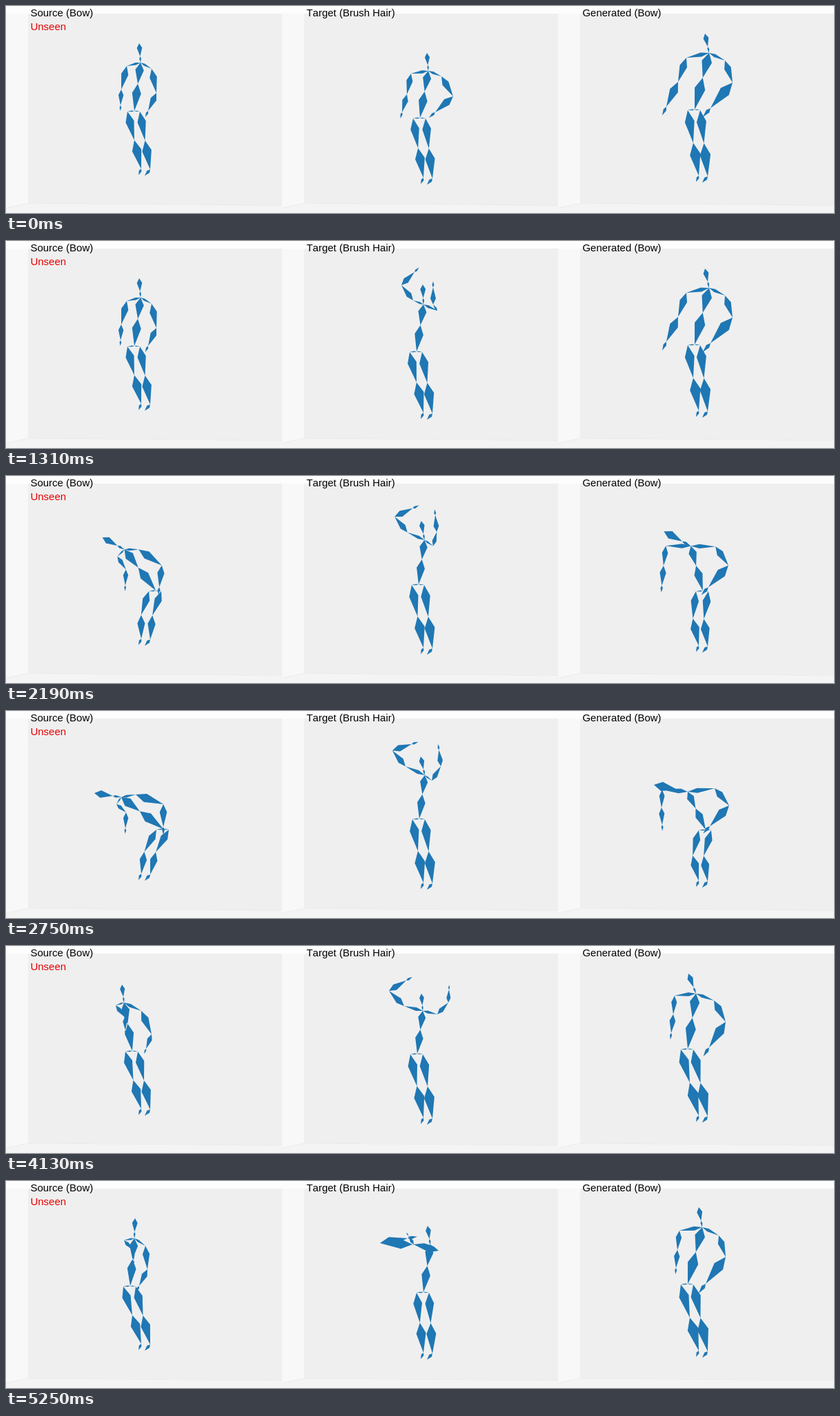
These frames come from a looping animation (1200 px wide and 300 px high, 5310 ms). An HTML page:

```html
<!DOCTYPE html>
<html lang="en">
<head>
<meta charset="utf-8">
<title>Three skeletons</title>
<style>
html, body { margin: 0; width: 100%; height: 100%; overflow: hidden; background: #fdfdfd; }
svg { display: block; width: 1200px; height: 300px; }
text { font: 15px "Liberation Sans", Arial, sans-serif; font-kerning: none; }
.bones { fill: #1f77b4; }
</style>
</head>
<body>
<svg viewBox="0 0 1200 300">
  <defs>
    <g id="room">
      <path fill="#f8f8f8" d="M0 11H32V286L0 293Z"/>
      <path fill="#f4f4f4" d="M0 293L32 286L400 289V300H0Z"/>
      <path fill="#efefef" d="M32 11H400V289L32 286Z"/>
      <path fill="none" stroke="#e9e9e9" stroke-width=".8" d="M0 293L32 286L400 289"/>
    </g>
  </defs>
  <use href="#room"/>
  <use href="#room" x="400"/>
  <use href="#room" x="800"/>
  <text x="35.4" y="15">Source (Bow)</text>
  <text x="35.4" y="35" fill="#e60000">Unseen</text>
  <text x="435.4" y="15">Target (Brush Hair)</text>
  <text x="835.4" y="15">Generated (Bow)</text>
  <path class="bones" id="bow"/>
  <path class="bones" id="brush"/>
  <path class="bones" id="made"/>
</svg>
<script>
const LOOP = 5310;

// Posed joints: pelvis, chest, head, then shoulder, elbow, wrist of each arm.
// Everything else follows from these and from the planted feet.
const PARENT = [-1, 0, 1, 1, 3, 4, 1, 6, 7];

function figure(id, ankle, leg) {
  return { el: document.getElementById(id), ankle, leg, keys: [] };
}

const bow = figure('bow', [196, 236], 84);
const brush = figure('brush', [605, 249], 88);
const made = figure('made', [1004, 246], 95);

// Keeps a pose as its root place plus a length and angle for each bone.
function pose(fig, steps, trunk, armL, armR) {
  const flat = [...trunk, ...armL, ...armR];
  const bones = PARENT.map((p, j) => {
    if (p < 0) return { x: flat[0], y: flat[1] };
    const dx = flat[2 * j] - flat[2 * p], dy = flat[2 * j + 1] - flat[2 * p + 1];
    return { len: Math.hypot(dx, dy), ang: Math.atan2(dy, dx) };
  });
  for (const step of steps) fig.keys.push({ step, bones });
}

// Upright, bent, rising, at rest.
pose(bow, [0, 21], [186,152, 195,82, 193,54], [175,87, 167,121, 166,144], [211,91, 218,126, 206,152]);
pose(bow, [42, 49], [228,171, 167,125, 128,119], [160,135, 174,147, 173,170], [188,121, 228,135, 228,168]);
pose(bow, [66], [183,152, 171,82, 168,56], [159,86, 172,103, 173,122], [196,94, 211,128, 203,149]);
pose(bow, [84], [180,152, 186,83, 187,54], [171,86, 184,100, 185,115], [202,94, 205,128, 193,152]);

// Hands low, at the head, brushing twice, stretched out.
pose(brush, [0], [600,162, 612,94, 610,68], [587,98, 581,128, 574,154], [631,102, 648,131, 622,154]);
pose(brush, [21], [595,160, 605,92, 604,63], [590,86, 573,64, 592,45], [625,101, 619,92, 619,67]);
pose(brush, [42], [599,156, 607,93, 601,66], [579,80, 560,57, 588,48], [617,101, 630,80, 627,56]);
pose(brush, [66], [596,156, 604,94, 602,69], [577,87, 555,65, 580,50], [625,99, 641,82, 642,63]);
pose(brush, [84], [605,161, 615,93, 611,65], [589,92, 542,90, 582,83], [627,101, 591,92, 583,79]);

pose(made, [0, 21], [998,150, 1019,68, 1013,40], [986,75, 974,110, 957,146], [1042,79, 1053,111, 1021,148]);
pose(made, [42, 49], [1014,172, 988,117, 939,107], [951,114, 950,140, 951,165], [1027,112, 1048,137, 1020,167]);
pose(made, [66], [988,149, 1000,69, 989,40], [969,72, 967,99, 964,126], [1026,79, 1043,110, 1019,147]);
pose(made, [84], [988,149, 1009,67, 1004,38], [976,72, 973,100, 971,126], [1033,79, 1043,110, 1014,149]);

const mix = (a, b, k) => a + (b - a) * k;
const along = (a, b, k) => [mix(a[0], b[0], k), mix(a[1], b[1], k)];
const ease = k => k * k * (3 - 2 * k);

function turn(a, b, k) {
  const d = b - a;
  return a + Math.atan2(Math.sin(d), Math.cos(d)) * k;
}

function jointsAt(fig, step) {
  const n = Math.max(1, fig.keys.findIndex(key => key.step >= step));
  const a = fig.keys[n - 1], b = fig.keys[n];
  const k = ease((step - a.step) / (b.step - a.step));
  const pts = [];
  PARENT.forEach((p, j) => {
    const s = a.bones[j], e = b.bones[j];
    if (p < 0) {
      pts.push([mix(s.x, e.x, k), mix(s.y, e.y, k)]);
      return;
    }
    const len = mix(s.len, e.len, k), ang = turn(s.ang, e.ang, k);
    pts.push([pts[p][0] + len * Math.cos(ang), pts[p][1] + len * Math.sin(ang)]);
  });
  return pts;
}

// A kite from a to b, widest a third of the way along; w is half its width over its length.
function kite(a, b, w) {
  const dx = (b[0] - a[0]) * w, dy = (b[1] - a[1]) * w;
  const [x, y] = along(a, b, .35);
  const pts = [a, [x - dy, y + dx], b, [x + dy, y - dx]];
  return 'M' + pts.map(p => p[0].toFixed(2) + ' ' + p[1].toFixed(2)).join('L') + 'Z';
}

function trunk(pelvis, chest, head) {
  const spine = along(chest, pelvis, .44), neck = along(chest, head, .32);
  return kite(spine, pelvis, .165) + kite(chest, spine, .2) + kite(neck, chest, .15) + kite(head, neck, .2);
}

function arm(chest, shoulder, elbow, wrist) {
  const hand = along(elbow, wrist, 1.35);
  return kite(chest, shoulder, .09) + kite(shoulder, elbow, .15) + kite(elbow, wrist, .16) + kite(wrist, hand, .17);
}

// The knee lies midway and moves forward as the leg shortens.
function leg(pelvis, hip, ankle, length, toe) {
  const knee = along(hip, ankle, .5);
  knee[0] -= .4 * Math.max(0, length - Math.hypot(hip[0] - ankle[0], hip[1] - ankle[1]));
  const foot = [ankle[0] - toe, ankle[1] + 9];
  return kite(pelvis, hip, .09) + kite(hip, knee, .145) + kite(knee, ankle, .16) + kite(ankle, foot, .2);
}

function draw(fig, step) {
  const [pelvis, chest, head, ...arms] = jointsAt(fig, step);
  const [px, py] = pelvis, [ax, ay] = fig.ankle;
  fig.el.setAttribute('d',
    trunk(pelvis, chest, head) +
    arm(chest, ...arms.slice(0, 3)) +
    arm(chest, ...arms.slice(3)) +
    leg(pelvis, [px - 10, py + 1], [ax, ay], fig.leg, 4) +
    leg(pelvis, [px + 8, py + 1], [ax + 13, ay + 1], fig.leg, 8));
}

const start = performance.now();

// Sixteen steps a second, each starting on a whole hundredth.
function tick() {
  const t = (performance.now() - start) % LOOP;
  const step = Math.floor((Math.floor(t / 10) + .49) / 6.25);
  for (const fig of [bow, brush, made]) draw(fig, step);
  requestAnimationFrame(tick);
}
tick();
</script>
</body>
</html>
```
